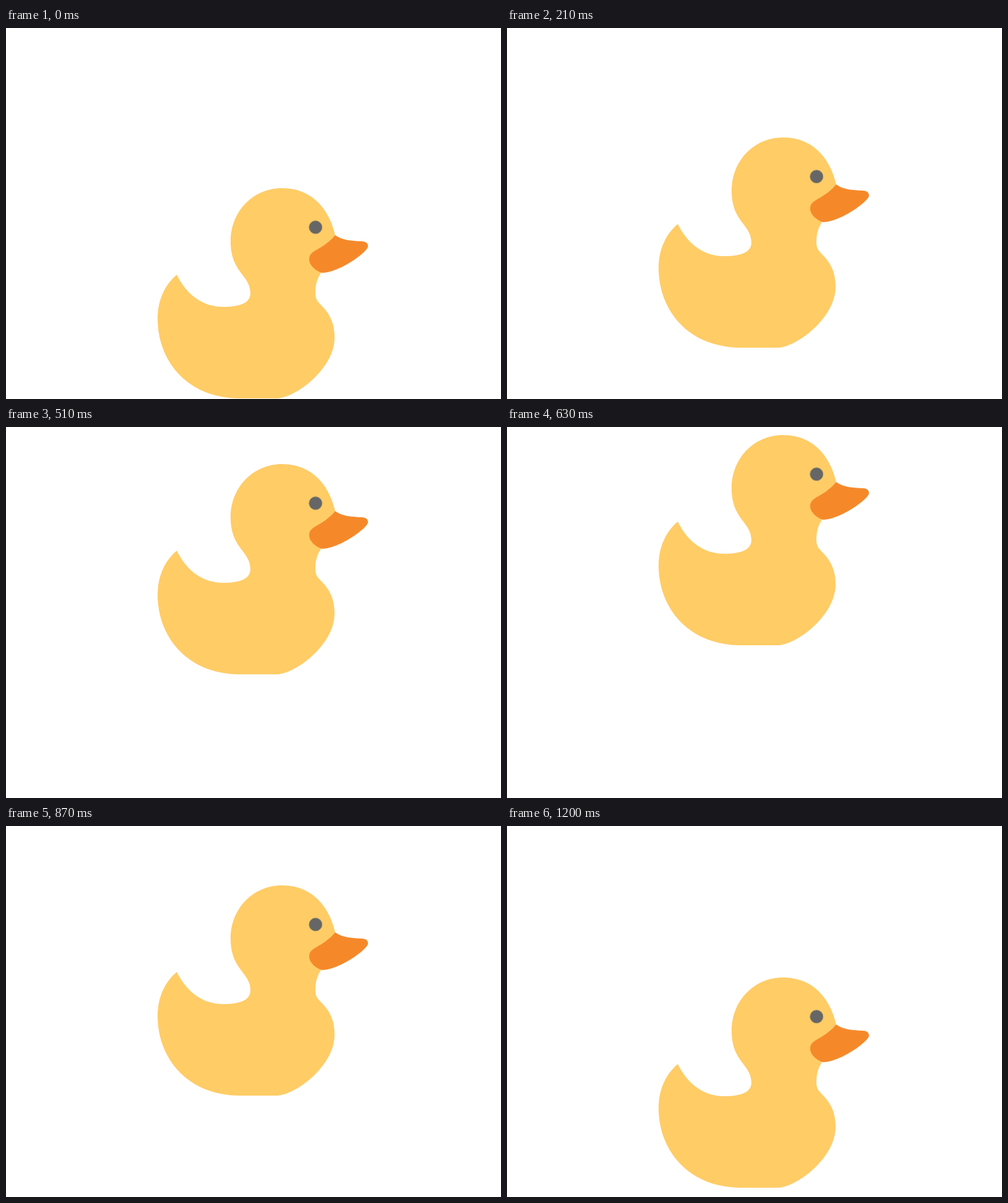
Recreate the animation shown at these times as an HTML page. Size 800 px wide and 600 px high, loop 1.23 s.

```html
<!DOCTYPE html>
<html lang="en">
<head>
<meta charset="utf-8">
<title>Bouncing duck</title>
<style>
  html, body { margin: 0; width: 100%; height: 100%; overflow: hidden; background: #fff; }
  svg { display: block; width: 100%; height: 100%; }
</style>
</head>
<body>
<svg viewBox="0 0 800 600">
  <g id="duck">
    <path fill="#ffcc66" d="M276 399 C293 433 319 451 351 451 C375 451 395 446 395 429
      C395 399 363 396 363 345 C363 297 399 259 446 259 C495 259 522 293 532 335
      L509 396 C503 405 500 415 500 428 C500 441 505 443 513 452
      C525 465 531 480 531 501 C531 548 474 595 440 599 L375 599
      C290 597 245 536 245 470 C245 441 256 416 276 399 Z"/>
    <path fill="#f5892a" d="M532 335 C545 344 558 344 575 345 C582 345.5 585 348 585 353
      C585 362 540 395 511 396 C503 394 490 385 490 374 C490 358 510 361 532 335 Z"/>
    <circle cx="500.3" cy="322.3" r="10.5" fill="#666" stroke="#948a66"/>
  </g>
</svg>
<script>
  const LOOP = 1230, STEP = 30, PEAK = 660, HEIGHT = 258;
  const duck = document.getElementById("duck");

  // Linear rise to the peak, then a slightly faster linear drop.
  function lift(t) {
    return HEIGHT * (t < PEAK ? t / PEAK : (LOOP - t) / (LOOP - PEAK));
  }

  function draw(ms) {
    const t = Math.floor((ms % LOOP) / STEP) * STEP;
    duck.setAttribute("transform", `translate(0 ${-Math.round(lift(t))})`);
  }

  const start = performance.now();
  function tick() {
    draw(performance.now() - start);
    requestAnimationFrame(tick);
  }
  tick();
</script>
</body>
</html>
```
